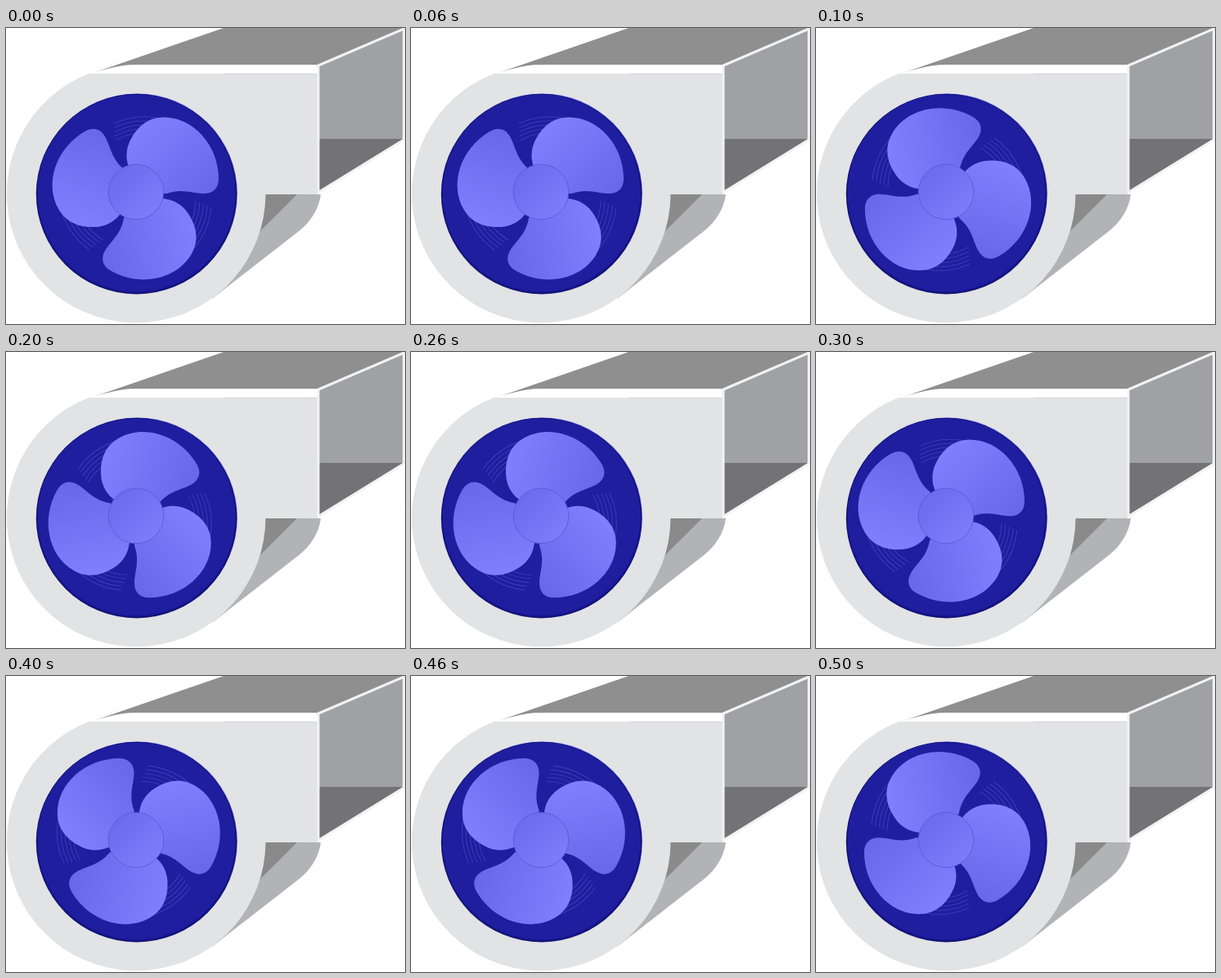
Write an HTML page that moves like this. It is 488 px wide and 363 px high and loops after 0.6 s.

```html
<!DOCTYPE html>
<html lang="en">
<head>
<meta charset="utf-8">
<title>Blower fan</title>
<style>
  html, body { margin: 0; width: 100%; height: 100%; overflow: hidden; background: #fff; }
  svg { display: block; width: 100%; height: 100%; }
</style>
</head>
<body>
<svg viewBox="0 0 488 363">
  <defs>
    <linearGradient id="bladeFill" gradientUnits="userSpaceOnUse" x1="3" y1="-83" x2="79" y2="2">
      <stop offset="0" stop-color="#8080ff"/>
      <stop offset="1" stop-color="#6868e8"/>
    </linearGradient>
    <linearGradient id="hubFill" x1="0.1" y1="0.1" x2="0.9" y2="0.9">
      <stop offset="0" stop-color="#6a6aea"/>
      <stop offset="1" stop-color="#7e7efd"/>
    </linearGradient>
    <path id="blade" fill="url(#bladeFill)" d="M-11 -32C-17 -47 -13 -60 -7.4 -69.2
      C0 -82 12 -93.7 31.6 -93.7C68 -93.7 98.6 -59 98.6 -18
      C98.6 -7 92 0 81 0C67 0 54 -7 35 0L0 0Z"/>
  </defs>

  <!-- duct -->
  <path fill="#8f8f8f" d="M101 57L266 0H488L382 46H159L103 57Z"/>
  <path fill="#a0a1a5" d="M382 46L487 1V137L382 202Z"/>
  <path fill="#737375" d="M382 136H487L382 202Z"/>

  <!-- lower outlet -->
  <path fill="#b2b3b7" d="M317 204H385C383 222 372 238 359 248.5L252 332Z"/>
  <path fill="#8a8a8a" d="M317 204H356L310 250Z"/>

  <!-- front casing -->
  <path fill="#fff" d="M101 56C115 53 135 45 159 45H381V57H101Z"/>
  <path fill="#e2e3e5" d="M101 56H381V204H317.5A158.3 158.3 0 1 1 101 56Z"/>
  <path stroke="#d2d3d5" d="M266 56.2H380"/>
  <path fill="none" stroke="#f2f2f4" stroke-width="3" stroke-linejoin="round" d="M382 46L486.5 1V137L382 201.5Z"/>

  <!-- fan -->
  <circle cx="160.5" cy="202.9" r="122.4" fill="#5a5ae0"/>
  <circle cx="159.6" cy="203.6" r="122.8" fill="#12126c"/>
  <circle cx="159.6" cy="203.4" r="121.9" fill="#15158a"/>
  <circle cx="159.5" cy="202.3" r="120.9" fill="#1e1e9e"/>
  <g id="rotor">
    <g id="streaks" fill="none" stroke="#4040bc" stroke-width=".9"></g>
    <g id="blades"></g>
  </g>
  <circle cx="159" cy="201" r="33.8" fill="url(#hubFill)" stroke="#5858d6" stroke-width=".8"/>
</svg>
<script>
  const PIVOT = [159.5, 200.7], BLADE_CENTER = [161.5, 203.1];
  const STEP = 100, POSES = [0, 60, 90, 120, 150, 180];
  const rotor = document.getElementById('rotor');

  function polar(r, deg) {
    const a = deg * Math.PI / 180;
    return `${r * Math.cos(a)} ${r * Math.sin(a)}`;
  }

  // Each streak drifts slightly outward towards its blade.
  function streak(r, from, to) {
    return `<path d="M${polar(r, from)}A${r} ${r} 0 0 1 ${polar(r + 5, to)}"/>`;
  }

  function build() {
    let blades = '', streaks = '';
    for (const turn of [0, 120, 240]) {
      const place = `transform="translate(${BLADE_CENTER}) rotate(${turn})"`;
      let lines = '';
      for (let i = 0; i < 5; i++) lines += streak(91 - i * 5, -109 - i, -74);
      blades += `<use href="#blade" ${place}/>`;
      streaks += `<g ${place}>${lines}</g>`;
    }
    document.getElementById('blades').innerHTML = blades;
    document.getElementById('streaks').innerHTML = streaks;
  }

  function draw(ms) {
    const angle = POSES[Math.floor(ms / STEP) % POSES.length];
    rotor.setAttribute('transform', `rotate(${angle} ${PIVOT})`);
  }

  build();
  const start = performance.now();
  draw(0);
  requestAnimationFrame(function tick(now) {
    draw(Math.max(0, now - start));
    requestAnimationFrame(tick);
  });
</script>
</body>
</html>
```
